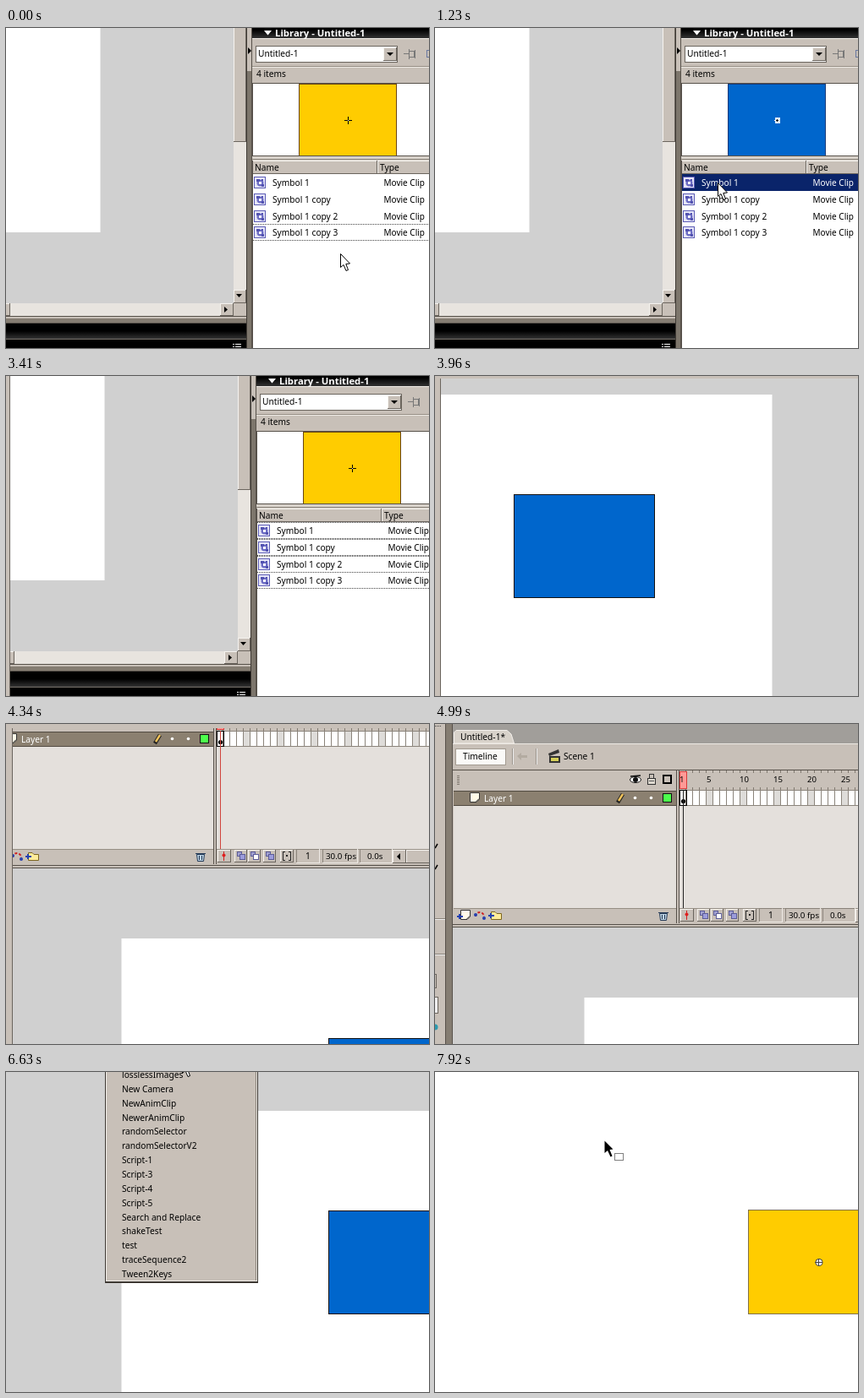
An HTML page with a canvas that plays this animation: 500 px wide and 379 px high, repeating every 8000 ms.

```html
<!DOCTYPE html>
<html lang="en">
<head>
<meta charset="utf-8">
<title>Library selection</title>
<style>
  html, body { margin: 0; width: 100%; height: 100%; overflow: hidden; background: #fff; }
  canvas { display: block; }
</style>
</head>
<body>
<canvas id="c" width="500" height="379"></canvas>
<script>
const g = document.getElementById('c').getContext('2d');
const LOOP = 8000, FACE = '#c8c0b8', GAP = '#857d72', EDGE = '#57514a', BODY = '#e4e0dc';
const NAVY = '#0a246a', YELLOW = '#ffcc00', BLUE = '#0066cc';
const FONT = '"Noto Sans", "Open Sans", sans-serif';

// Each move: first step time, last step time, step count, target x, target y
const CAMERA = [
  [3410, 3410, 1, 610, 482], [3500, 3770, 4, 400, 360], [3960, 4340, 5, 40, 70],
  [4430, 4990, 7, 0, 0], [5080, 5370, 4, 40, 278]
];
const POINTER = [
  [280, 550, 4, 349, 190], [860, 860, 1, 334, 183], [1410, 1860, 6, 334, 244],
  [2480, 2920, 6, 312, -24], [5400, 5400, 1, 209, -27],
  [6630, 7350, 8, 202, 72], [7450, 7650, 3, 202, 83]
];
const COMMANDS = ['losslessImages', 'New Camera', 'NewAnimClip', 'NewerAnimClip', 'randomSelector',
  'randomSelectorV2', 'Script-1', 'Script-3', 'Script-4', 'Script-5', 'Search and Replace',
  'shakeTest', 'test', 'traceSequence2', 'Tween2Keys'];
const SYMBOLS = ['Symbol 1', 'Symbol 1 copy', 'Symbol 1 copy 2', 'Symbol 1 copy 3'];

function follow(moves, t, x, y) {
  for (const [start, end, n, tx, ty] of moves) {
    if (t < start) break;
    const done = n === 1 ? 1 : Math.min(n, Math.floor((t - start) / (end - start) * (n - 1) + 0.001) + 1);
    x += (tx - x) * done / n;
    y += (ty - y) * done / n;
  }
  return [Math.round(x), Math.round(y)];
}

function box(x, y, w, h, color) { g.fillStyle = color; g.fillRect(x, y, w, h); }
function frame(x, y, w, h, color) { g.strokeStyle = color; g.lineWidth = 1; g.strokeRect(x + 0.5, y + 0.5, w - 1, h - 1); }
function text(s, x, y, color = '#000', font = '10.2px') {
  g.fillStyle = color;
  g.font = `${font} ${FONT}`;
  g.fillText(s, x, y);
}
function poly(points, fill, stroke) {
  g.beginPath();
  for (let i = 0; i < points.length; i += 2) g.lineTo(points[i], points[i + 1]);
  g.closePath();
  if (fill) { g.fillStyle = fill; g.fill(); }
  if (stroke) { g.strokeStyle = stroke; g.lineWidth = 1; g.stroke(); }
}
function dot(x, y, r, color) {
  g.beginPath();
  g.arc(x, y, r, 0, 7);
  g.fillStyle = color;
  g.fill();
}
function line(x1, y1, x2, y2, color, width = 1) {
  g.beginPath();
  g.moveTo(x1, y1);
  g.lineTo(x2, y2);
  g.strokeStyle = color;
  g.lineWidth = width;
  g.stroke();
}
function dotted(x, y, w, color = '#444') { for (let i = 0; i < w; i += 2) box(x + i, y, 1, 1, color); }
function raised(x, y, w, h, fill = FACE) {
  box(x, y, w, h, '#6b655e');
  box(x, y, w - 1, h - 1, '#f6f3ef');
  box(x + 1, y + 1, w - 2, h - 2, fill);
}
function sunken(x, y, w, h) {
  box(x, y, w, h, '#eeeae5');
  box(x, y, w - 1, h - 1, '#8a837a');
  box(x + 1, y + 1, w - 2, h - 2, FACE);
}
function bar(x, y, w, h) {
  const fade = g.createLinearGradient(0, y, 0, y + h);
  fade.addColorStop(0, '#000');
  fade.addColorStop(0.5, '#000');
  fade.addColorStop(1, '#333');
  box(x, y, w, h, fade);
}
function cross(x, y, r, color) { box(x - r, y, 2 * r + 1, 1, color); box(x, y - r, 1, 2 * r + 1, color); }

function toolPanel() {
  box(0, 0, 13, 379, FACE);
  dotted(0, 2, 8);
  box(12, 0, 1, 379, EDGE);
  box(13, 0, 7, 379, GAP);
  for (const y of [145, 170]) line(0, y + 2, 3, y - 3, '#000', 1.5);
  for (const y of [230, 272]) { box(0, y, 12, 1, '#8a837a'); box(0, y + 1, 12, 1, '#eee'); }
  frame(-9, 296, 11, 17, '#6b655e');
  box(0, 323, 4, 19, '#eee');
  frame(-9, 323, 13, 20, '#6b655e');
  dot(0, 359, 3.5, '#2b9ab0');
}

function pencil(x, y) {
  line(x - 3, y + 5, x + 3, y - 5, '#222', 4.5);
  line(x - 2, y + 3, x + 3, y - 5, '#f2c35a', 2.5);
}
function page(x, y) {
  poly([x - 5.5, y - 5.5, x + 5.5, y - 5.5, x + 5.5, y + 2, x + 2, y + 5.5, x - 5.5, y + 5.5], '#fffbe8', '#333');
  line(x + 1.5, y + 5, x + 5, y + 1.5, '#333');
}
function plus(x, y) { box(x - 3, y, 7, 2, '#2440b0'); box(x - 1, y - 2, 2, 6, '#2440b0'); }

function timeline(t) {
  box(20, 0, 880, 238, FACE);
  box(21, 0, 878, 23, '#a19e9a');
  poly([22.5, 23, 22.5, 10, 25, 7.5, 85, 7.5, 90, 12, 93.5, 23], '#d8d2ca', '#f4f0ec');
  text('Untitled-1*', 30, 19);
  box(21, 23, 878, 1, '#eeeae5');

  raised(24, 29, 60, 20, '#faf9f7');
  frame(24, 29, 60, 20, '#a39b91');
  text('Timeline', 33, 42);
  for (const x of [91, 119]) { box(x, 29, 1, 19, '#9a938a'); box(x + 1, 29, 1, 19, '#eee'); }
  poly([97, 38, 102, 34, 102, 37, 109, 37, 109, 40, 102, 40, 102, 43], '#b3aba1');
  poly([134, 35, 146, 30, 147, 34, 135, 38], '#333');
  box(135, 38, 13, 8, '#333');
  box(137, 40, 9, 4, '#d5cf59');
  text('Scene 1', 152, 42);
  box(20, 54, 880, 1, EDGE);

  for (let y = 61; y < 72; y += 2) box(26, y, 3, 1, '#817a71');
  g.beginPath();
  g.ellipse(237, 66, 6.5, 3.5, 0, 0, 7);
  g.fillStyle = '#fff';
  g.fill();
  g.strokeStyle = '#111';
  g.stroke();
  dot(237, 66, 3, '#111');
  line(231, 62, 243, 61, '#111', 1.5);
  frame(253, 59, 6, 8, '#333');
  box(251, 64, 10, 8, '#333');
  box(252, 65, 8, 6, '#ddd8cf');
  box(253, 67, 6, 1, '#555');
  frame(269, 60, 11, 11, '#000');
  frame(270, 61, 9, 9, '#000');

  box(22, 79, 263, 18, '#524b42');
  box(22, 80, 263, 16, '#8b8070');
  page(47, 87);
  text('Layer 1', 58, 92, '#fff');
  pencil(219, 88);
  dot(236.5, 87.5, 1.8, '#fff');
  dot(255.5, 87.5, 1.8, '#fff');
  box(269, 82, 11, 11, '#111');
  box(270, 83, 9, 9, '#4cff4c');
  box(22, 97, 263, 121, BODY);
  box(22, 218, 263, 1, '#958e84');
  page(36, 226);
  plus(29, 227);
  g.setLineDash([3, 2]);
  g.beginPath();
  g.arc(53, 228, 5, Math.PI, 0);
  g.strokeStyle = '#d02020';
  g.lineWidth = 2;
  g.stroke();
  g.setLineDash([]);
  dot(48, 226, 2, '#2440b0');
  dot(58, 230, 2, '#2440b0');
  poly([66.5, 222.5, 71, 222.5, 73, 224.5, 78.5, 224.5, 78.5, 231.5, 66.5, 231.5], '#ffec9a', '#7d6620');
  plus(66, 226);
  poly([265.5, 224.5, 274.5, 224.5, 273.5, 232.5, 266.5, 232.5], '#b9cfe0', '#243a57');
  line(264, 223.5, 276, 223.5, '#243a57');
  for (const x of [268.5, 271.5]) line(x, 226, x, 231, '#243a57');

  box(285, 54, 1, 182, EDGE);
  box(288, 54, 1, 182, EDGE);
  box(289, 97, 611, 121, BODY);
  box(289, 78, 611, 19, '#8b847b');
  for (let i = 0; i < 76; i++) {
    const x = 289 + 8 * i;
    box(x, 79, 7, 17, (i + 1) % 5 ? '#fff' : '#dedcd9');
    box(x + 7, 55, 1, 3, '#807970');
    box(x + 7, 75, 1, 3, '#807970');
    if ((i + 1) % 5 === 0) text(i + 1, x - (i < 9 ? 0 : 1), 69, '#000', '9.6px');
  }
  box(289, 56, 9, 21, '#d83a3a');
  box(290, 57, 7, 19, '#ff9a96');
  text('1', 289, 69, '#000', '9.6px');
  frame(289, 78, 9, 19, '#000');
  dot(293.5, 91.5, 2.6, '#000');
  box(293, 78, 1, 140, t < 4700 ? '#d0443c' : '#222');

  box(289, 218, 611, 1, '#958e84');
  raised(290, 219, 16, 15);
  box(297, 221, 1, 11, '#d02020');
  dot(297.5, 225.5, 2, '#e02020');
  for (const x of [311, 327, 345]) {
    raised(x - 1, 219, 15, 15);
    box(x + 2, 221, 6, 6, '#a0a0d0');
    frame(x + 2, 221, 6, 6, '#5c5c98');
    box(x + 5, 224, 7, 7, x === 327 ? '#fff' : '#9c9cdb');
    frame(x + 5, 224, 7, 7, '#5c5c98');
  }
  raised(364, 219, 16, 15);
  for (const x of [367, 376]) {
    box(x, 221, 1, 11, '#222');
    for (const y of [221, 231]) box(x === 367 ? 367 : 374, y, 3, 1, '#222');
  }
  box(371, 225, 2, 2, '#222');
  sunken(383, 218, 28, 17);
  sunken(414, 218, 42, 17);
  sunken(458, 218, 39, 17);
  text('1', 394, 230);
  text('30.0 fps', 418, 230, '#000', '9.8px');
  text('0.0s', 467, 230, '#000', '9.8px');
  box(497, 219, 402, 16, '#e8e4df');
  raised(497, 219, 16, 16);
  poly([502, 227, 506, 223, 506, 231], '#000');
  raised(513, 219, 250, 16);
  box(20, 237, 880, 1, EDGE);
  box(20, 238, 880, 2, FACE);
  box(20, 240, 880, 1, EDGE);
}

function editor(t) {
  box(21, 241, 863, 567, '#d0d0d0');
  box(176.5, 324, 550, 400, '#fff');
  box(421, 443, 167, 122, BLUE);
  frame(421, 442, 167, 123, '#111');
  timeline(t);
  box(20, 0, 1, 823, EDGE);

  box(884, 241, 15, 567, '#e8e4df');
  raised(884, 300, 15, 317);
  raised(884, 792, 15, 16);
  poly([887, 797, 894, 797, 890.5, 801], '#000');
  box(21, 808, 847, 15, '#e8e4df');
  raised(300, 808, 320, 15);
  raised(868, 808, 16, 15);
  poly([873, 812, 873, 819, 877, 815.5], '#000');
  box(884, 808, 15, 15, FACE);
  box(20, 823, 880, 1, EDGE);
  box(20, 824, 880, 2, FACE);
  box(20, 826, 880, 5, GAP);
  box(20, 831, 880, 1, EDGE);
  bar(20, 832, 879, 18);
  box(20, 850, 879, 1, '#77716a');
  bar(20, 851, 879, 18);
  box(20, 869, 879, 30, '#000');
  for (const y of [856, 859]) {
    box(883, y, 2, 1, '#fff');
    box(886, y, 7, 1, '#fff');
  }
  box(899, 0, 7, 900, '#7d766c');
  box(899, 0, 1, 900, '#3f3a34');
  box(905, 0, 1, 900, EDGE);
  box(900, 482, 5, 51, FACE);
  poly([901, 505, 901, 513, 905, 509], '#000');
}

function symbolIcon(x, y) {
  box(x, y, 14, 14, '#5a5ab4');
  box(x + 1, y + 1, 12, 12, '#e6e6f8');
  dot(x + 7.5, y + 7.5, 4, '#6c6cc4');
  box(x + 3, y + 3, 4, 3, '#5252b0');
  box(x + 9, y + 3, 2, 2, '#5252b0');
  box(x + 9, y + 9, 3, 3, '#5252b0');
  box(x + 6, y + 6, 3, 3, '#fff');
}

function library(t) {
  g.save();
  g.translate(615, 482);
  box(291, -482, 300, 900, FACE);
  bar(291, -8, 300, 20);
  box(291, 12, 300, 1, '#f0ece7');
  poly([305, 3, 314, 3, 309.5, 8.5], '#fff');
  text('Library - Untitled-1', 318, 9.5, '#fff', 'bold 11.3px');

  box(295, 21, 168, 20, '#6b655e');
  box(296, 22, 166, 18, '#fff');
  text('Untitled-1', 298, 34);
  raised(446, 23, 16, 16);
  poly([450, 29, 458, 29, 454, 33], '#000');
  line(470, 30.5, 476, 30.5, '#777');
  frame(476, 27, 7, 8, '#777');
  box(476, 25, 1, 12, '#777');
  box(483, 26, 1, 10, '#777');
  frame(497, 26, 9, 9, '#6878a0');
  box(291, 45, 300, 1, '#958e84');
  box(291, 46, 300, 1, '#eeeae5');
  text('4 items', 296, 58);

  const blue = t >= 1230 && t < 2160;
  box(291, 65, 300, 87, EDGE);
  box(292, 66, 300, 85, '#fff');
  box(346, 66, 116, 85, blue ? '#173a78' : '#6a4512');
  box(347, 67, 114, 84, blue ? BLUE : YELLOW);
  if (blue) {
    box(402, 106, 6, 7, '#dce9f8');
    cross(404, 109, 3, '#fff');
    cross(404, 109, 1, '#111');
  } else {
    cross(404, 109, 4, '#000');
    box(404, 109, 1, 1, '#fff');
  }

  box(291, 152, 300, 5, '#d8d2ca');
  box(291, 155, 300, 1, '#8a837a');
  raised(291, 157, 148, 16);
  raised(439, 157, 148, 16);
  text('Name', 294, 169);
  text('Type', 442, 169);
  box(291, 173, 300, 300, '#fff');
  SYMBOLS.forEach((name, i) => {
    const y = 173 + i * 20 - (i === 3 ? 1 : 0);
    const chosen = (t >= 1230 && i === 0 || t >= 2160) && t < 3410;
    const outlined = t < 1230 && i === 3 || t >= 3410;
    if (chosen) box(292, y, 300, 20, NAVY);
    if (outlined) { dotted(292, y, 298); dotted(292, y + 19, 298); }
    symbolIcon(293, y + 3);
    const ink = chosen ? '#fff' : '#000';
    text(name, 315, y + 14, ink);
    text('Movie Clip', 446.5, y + 14, ink, '10px');
  });
  box(291, 157, 1, 300, EDGE);
  g.restore();
}

function menu(pointerY) {
  const step = 16.86;
  const active = Math.floor((pointerY + 5.4) / step);
  box(117, -300, 181, 550, '#3c3731');
  box(118, -300, 179, 548, '#f2eee9');
  box(119, -300, 177, 547, '#8a837a');
  box(119, -300, 176, 547, FACE);
  COMMANDS.forEach((name, i) => {
    const y = 3 + i * step;
    if (i === active) box(120, Math.round(y - 8.4), 175, 17, NAVY);
    text(name, 137, Math.round(y + 4), i === active ? '#fff' : '#000');
  });
}

function arrow(x, y, black) {
  g.save();
  g.translate(x + 0.5, y + 0.5);
  if (black) {
    poly([0, 0, 0, 14.5, 3.5, 11.5, 7, 19, 9, 18, 6, 10.5, 10, 10], '#000');
    g.setLineDash([1, 1]);
    g.strokeStyle = '#000';
    g.lineWidth = 1;
    g.strokeRect(12, 15, 10, 8);
    g.setLineDash([]);
  } else {
    poly([0, 0, 0, 16, 3.5, 13, 6.5, 20, 9, 19, 6.3, 12, 11, 11.5], '#fff', '#000');
  }
  g.restore();
}

function symbolEditor() {
  box(0, 0, 500, 379, '#fff');
  box(371, 163, 167, 124, YELLOW);
  frame(370, 163, 168, 124, '#80704a');
  dot(454, 225.5, 4.5, '#444');
  dot(454, 225.5, 3.5, '#fff');
  cross(453, 225, 4, '#444');
}

function draw(t) {
  if (t >= 7920) {
    symbolEditor();
    arrow(200, 81, true);
    return;
  }
  const [cx, cy] = follow(CAMERA, t, 615, 482);
  const [px, py] = follow(POINTER, t, 395, 267);
  box(0, 0, 500, 379, FACE);
  g.save();
  g.translate(-cx, -cy);
  toolPanel();
  editor(t);
  library(t);
  g.restore();

  // Uncovered edge while the view is dragged along
  if (t >= 3410 && t < 4700) {
    const p = Math.min(1, (t - 3410) / 930), w = Math.round(5 + 3 * p), h = Math.round(5 * p);
    box(0, 0, w, 379, FACE);
    box(0, 0, 500, h, FACE);
    box(w - 1, h, 1, 379, '#6b655e');
  }
  if (t >= 6020 && t < 7840) menu(py);
  arrow(px, py, t >= 7840);
}

const begin = performance.now();
function tick() {
  draw((performance.now() - begin) % LOOP);
  requestAnimationFrame(tick);
}
tick();
</script>
</body>
</html>
```
